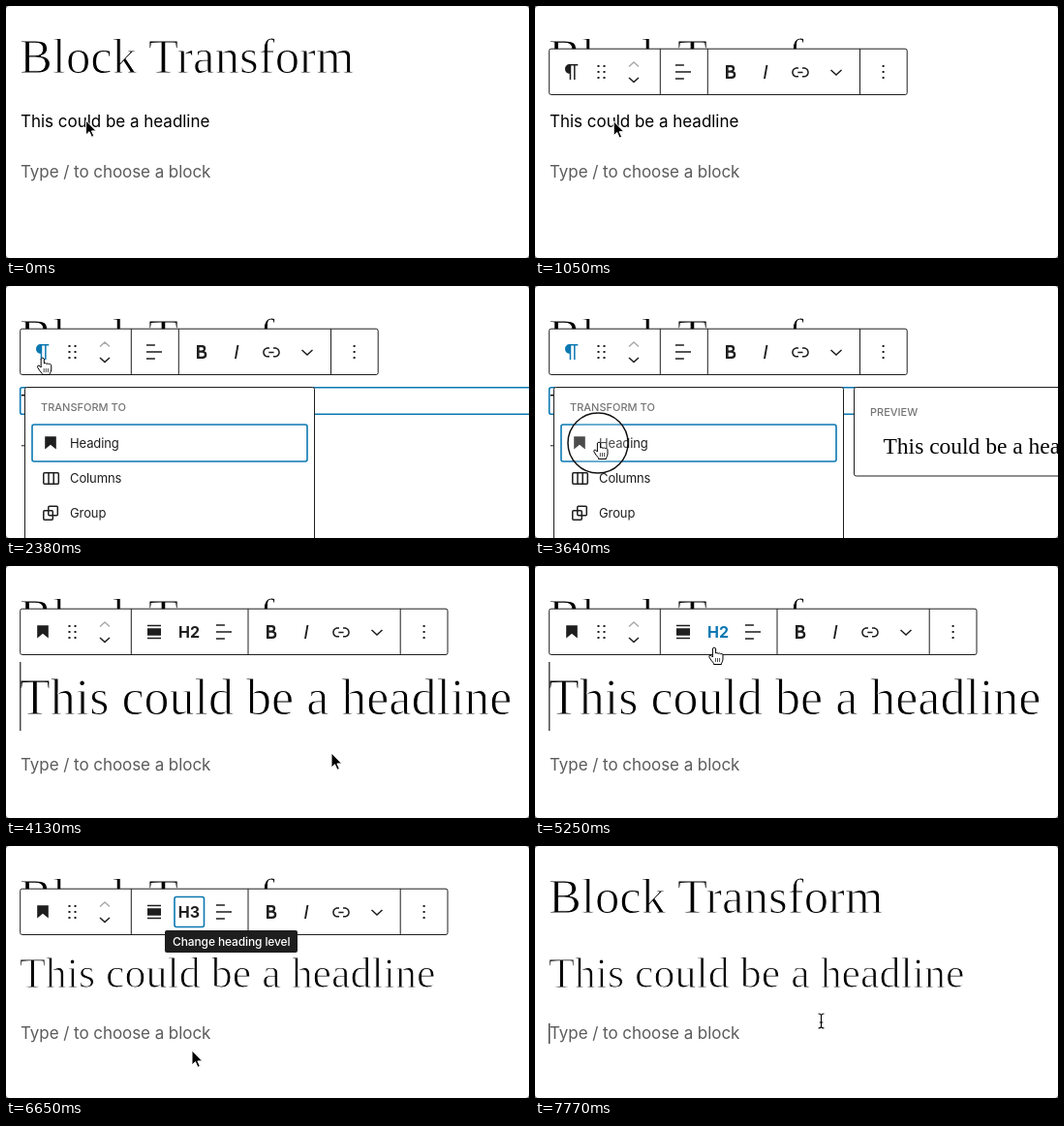
These frames come from a looping animation (540 px wide and 260 px high, 8 s). An HTML page:

```html
<!DOCTYPE html>
<html lang="en">
<head>
<meta charset="utf-8">
<title>Block Transform</title>
<style>
html, body { margin: 0; width: 100%; height: 100%; overflow: hidden; background: #fff; }
svg { display: block; width: 540px; height: 260px; }
text { font-family: Inter, "Open Sans", sans-serif; fill: #1e1e1e; white-space: pre; }
.display { font-family: "Noto Serif", serif; font-weight: 200; font-stretch: 87.5%; fill: #000; }
.plain .display { font-family: "Liberation Serif", serif; font-weight: 400; stroke: #fff; stroke-width: 1.1px; }
.serif { font-family: "Liberation Serif", serif; fill: #000; }
.body { font-size: 17px; letter-spacing: -.02px; fill: #000; }
.hint { font-size: 17px; letter-spacing: -.06px; fill: #5c5c5c; }
.item { font-size: 13px; letter-spacing: -.12px; }
.label { font-size: 11px; font-weight: 500; fill: #757575; }
.level { font-weight: 700; text-anchor: middle; }
.panel { fill: #fff; stroke: #1e1e1e; }
.ring { fill: none; stroke: #0b78b2; stroke-width: 1.6px; }
.line { fill: none; stroke: #1e1e1e; stroke-width: 1.5px; }
</style>
</head>
<body>
<svg id="stage" viewBox="0 0 540 260"></svg>
<script>
const LOOP = 8000;
const INK = '#1e1e1e', BLUE = '#0b78b2';

const icons = {
  para: 'M18.3 4H9.9v-.1l-.9.2c-2.3.4-4 2.4-4 4.8s1.7 4.4 4 4.8l.7.1V20h1.5V5.5h2.9V20h1.5V5.5h2.7V4z',
  mark: 'M6.2 5.2v13.4l5.8-4.8 5.8 4.8V5.2z',
  drag: 'M6.5 5h2v2h-2zM12.5 5h2v2h-2zM6.5 11h2v2h-2zM12.5 11h2v2h-2zM6.5 17h2v2h-2zM12.5 17h2v2h-2z',
  text: 'M4 19.8h8.9v-1.5H4zM4 4.2h8.9v1.5H4zM4 11.2h16v1.5H4z',
  wide: 'M5 4.7h14v1.5H5zM5 8.3h14v7.4H5zM5 17.8h14v1.5H5z',
  bold: 'M14.7 11.3c1-.6 1.5-1.6 1.5-3 0-2.3-1.3-3.4-4-3.4H7v14h5.8c1.4 0 2.5-.3 3.3-1 .8-.7 1.2-1.7 1.2-2.9.1-1.9-.8-3.1-2.6-3.7zm-5.1-4h2.3c.6 0 1.1.1 1.4.4.3.3.5.7.5 1.2s-.2 1-.5 1.2c-.3.3-.8.4-1.4.4H9.6V7.3zm4.6 9c-.4.3-1 .4-1.7.4H9.6v-3.9h2.9c.7 0 1.3.2 1.7.5.4.3.6.8.6 1.5s-.2 1.2-.6 1.5z',
  italic: 'M12.5 5L10 19h1.9l2.5-14z',
  link: 'M15.6 7.2H14v1.5h1.6c2 0 3.7 1.7 3.7 3.7s-1.7 3.7-3.7 3.7H14v1.5h1.6c2.8 0 5.2-2.3 5.2-5.2 0-2.9-2.3-5.2-5.2-5.2zM4.7 12.4c0-2 1.7-3.7 3.7-3.7H10V7.2H8.4c-2.9 0-5.2 2.3-5.2 5.2 0 2.9 2.3 5.2 5.2 5.2H10v-1.5H8.4c-2 0-3.7-1.7-3.7-3.7zm4.6.9h5.3v-1.5H9.3v1.5z',
  down: 'M17 9.4L12 14 7 9.4l-1 1.1 6 5.5 6-5.5z',
  more: 'M13 19h-2v-2h2zM13 13h-2v-2h2zM13 7h-2V5h2z'
};

// Icons are 24px boxes placed by their centre.
const icon = (name, x, y = 68, fill = INK, id = '') =>
  `<path id="${id}" fill="${fill}" transform="translate(${x - 12} ${y - 12})" d="${icons[name]}"/>`;
const text = (cls, x, y, str, extra = '') => `<text class="${cls}" x="${x}" y="${y}" ${extra}>${str}</text>`;
const group = (id, body) => `<g id="${id}">${body}</g>`;
const box = (cls, x, y, w, h) => `<rect class="${cls}" x="${x}" y="${y}" width="${w}" height="${h}" rx="2"/>`;

const movers =
  '<path class="line" style="stroke:#aaa" d="M97 62.5l5-4.5 5 4.5"/><path class="line" d="M97 74l5 4.5 5-4.5"/>';

function toolbar(width, seps, shift) {
  return box('panel', 14.7, 44.2, width, 47.3) +
    seps.map(x => `<path stroke="${INK}" d="M${x} 44v47"/>`).join('') +
    icon('drag', 70) + movers +
    icon('text', 153 + shift) + icon('bold', 202 + shift) + icon('italic', 238 + shift) +
    icon('link', 274 + shift) + icon('down', 311 + shift) + icon('more', 359.6 + shift);
}

const columnsIcon = '<rect class="line" x="38.8" y="192.8" width="15.5" height="11.5" rx="1"/><path class="line" d="M44 193v11M49.2 193v11"/>';
const groupIcon = '<rect class="line" x="43.8" y="227.3" width="9.5" height="9.5" rx="1"/><rect class="line" x="38.8" y="231.8" width="9.5" height="9.5" rx="1"/>';

const levels = [1, 2, 3, 4].map((n, i) => {
  const y = 131 + 36 * i, on = n === 2;
  return (on ? `<rect x="184" y="${y - 12}" width="24" height="24" rx="1" fill="${INK}"/>` : '') +
    text('level', 196, y + 5, 'H' + n, `font-size="14" style="fill:${on ? '#fff' : INK}"`) +
    text('item', 216, y + 5, 'Heading ' + n);
}).join('');

const arrow = '<path fill="#000" stroke="#fff" d="M0 0V15l3.5-3.3 2.5 5.6 2.4-1-2.5-5.4h4.8Z"/>';
const hand = '<path fill="#fff" stroke="#000" stroke-linejoin="round" ' +
  'd="M-1.6 0q1.6-2 3.2 0V5q1.4-1 2.5.3 1.4-.9 2.5.4 1.5-.7 2.4.8V11q0 2.5-1.5 4.3V16.5H-.5V15.3Q-3.6 12-5.2 8.8-5.4 6.8-3.8 7.1-2.6 7.6-1.6 9Z"/>' +
  '<path stroke="#000" stroke-width=".7" d="M1.4 10v4M3.5 10v4M5.6 10v4"/>';
const beam = 'M-3-7Q-.5-7 0-5.5Q.5-7 3-7M0-5.5V6.5M-3 8Q-.5 8 0 6.5Q.5 8 3 8M-1.8 2H1.8';
const ibeam = ['#fff" stroke-width="2.6', '#000" stroke-width="1.1']
  .map(s => `<path fill="none" stroke="${s}" d="${beam}"/>`).join('');

const stage = document.getElementById('stage');
const line = 'This could be a headline';
stage.innerHTML =
  text('display', 14, 69, 'Block Transform', 'id="title"') +
  text('body', 15, 125, line, 'id="para"') +
  text('display', 14, 153, line, 'id="head"') +
  text('hint', 15, 177, 'Type / to choose a block', 'id="hint"') +
  `<rect id="caret" x="14.2" width="1.2" fill="${INK}"/>` +
  group('outline', box('ring', 14.7, 104.7, 540, 27.6)) +
  group('barPara', toolbar(369.5, [129.3, 178.3, 335.5], 0) + icon('para', 38, 68, INK, 'mode')) +
  group('barHead', toolbar(441.3, [129.3, 250, 407.2], 72) + icon('mark', 38) + icon('wide', 153) +
    text('level', 189, 74, 'H2', 'id="level" font-size="16"')) +
  group('focus', box('ring', 174, 52.5, 30.5, 31)) +
  group('menu', box('panel', 19.5, 104.5, 299, 200) + text('label', 36, 129, 'TRANSFORM TO') +
    box('ring', 27, 143, 284, 38) + icon('mark', 46, 162) + columnsIcon + groupIcon +
    ['Heading', 'Columns', 'Group'].map((s, i) => text('item', 66, 167 + 36 * i, s)).join('')) +
  group('preview', box('panel', 329.5, 104.5, 300, 91.5) + text('label', 346, 134, 'PREVIEW') +
    text('serif', 359.5, 173, line, 'font-size="23.5"')) +
  group('levels', box('panel', 169.5, 104.5, 202, 240) + box('ring', 177, 112, 187, 38) + levels) +
  group('tip', `<rect x="164" y="87" width="137" height="23" rx="2" fill="${INK}"/>` +
    text('', 172, 102.5, 'Change heading level', 'font-size="12" font-weight="500" letter-spacing="-.12" style="fill:#fff"')) +
  '<circle id="ping" fill="#fff" fill-opacity=".2" stroke="#111" stroke-width="1.5"/>' +
  group('cursor', group('arrow', arrow) + group('hand', hand) + group('ibeam', ibeam)) +
  '<path fill="#777" fill-rule="evenodd" d="M0 0H540V260H0ZM4 0Q0 0 0 4V256Q0 260 4 260H536Q540 260 540 256V4Q540 0 536 0Z"/>';

const el = {};
stage.querySelectorAll('[id]').forEach(n => { if (n.id) el[n.id] = n; });

// Use a plain serif where the light cut is not installed.
function hasLight() {
  const width = weight => {
    el.head.style.fontWeight = weight;
    return el.head.getComputedTextLength();
  };
  el.head.setAttribute('font-size', 100);
  const differs = Math.abs(width(200) - width(400)) > 1;
  el.head.style.fontWeight = '';
  return differs;
}
stage.classList.toggle('plain', !hasLight());

// Font size at which a line of text has the given width
function sizeFor(node, width) {
  node.setAttribute('font-size', 100);
  return 100 * width / node.getComputedTextLength();
}
el.title.setAttribute('font-size', sizeFor(el.title, 345.5));
const big = sizeFor(el.head, 508.5), small = big * .845;

// Pointer stops: time, x, y
const path = [
  [0, 82.5, 118], [540, 82.5, 118], [650, 80, 113], [770, 82, 118], [900, 82, 118], [1120, 81, 119],
  [1380, 81, 119], [1840, 37, 75], [2170, 37, 75], [2480, 38, 75], [3020, 66, 162], [3740, 66, 162],
  [3990, 336, 193], [4740, 336, 193], [5200, 185, 85], [5300, 185, 85], [5500, 189, 71], [5740, 189, 71],
  [6180, 192, 211], [7240, 192, 211], [7560, 295.5, 180], [LOOP, 295.5, 180]
];
// Clicks: start, end, x, y, radius
const clicks = [
  [70, 140, 83, 119, 22], [2030, 2170, 36.5, 71, 31], [3530, 3710, 65, 162, 31],
  [5530, 5670, 189, 70, 31], [6230, 6370, 192, 211, 31], [7560, 7700, 295, 180, 31]
];
// Caret: start, end, y, height
const carets = [[70, 560, 162, 20], [3990, 4480, 99, 71], [4970, 5460, 99, 71], [7700, LOOP, 183, 21]];

const within = (t, a, b) => t >= a && t < b;
const show = (id, on) => { el[id].style.display = on ? '' : 'none'; };
const set = (id, attrs) => { for (const k in attrs) el[id].setAttribute(k, attrs[k]); };
const ease = u => u * u * (3 - 2 * u);

function pointer(t) {
  let i = 1;
  while (path[i][0] <= t) i++;
  const [t0, x0, y0] = path[i - 1], [t1, x1, y1] = path[i];
  const u = ease((t - t0) / (t1 - t0));
  return [x0 + (x1 - x0) * u, y0 + (y1 - y0) * u];
}

function popover(id, t, from, to, x, y) {
  show(id, within(t, from, to));
  const s = Math.min(1, .5 + (t - from) / 200);
  set(id, { transform: `translate(${x} ${y}) scale(${s}) translate(${-x} ${-y})` });
}

function draw(t) {
  const isPara = t < 3710, isSmall = t >= 6440;
  show('para', isPara);
  show('head', !isPara);
  set('head', { 'font-size': isSmall ? small : big, y: isSmall ? 145.5 : 153 });
  set('hint', { y: isPara ? 177.3 : isSmall ? 199.3 : 211 });

  show('barPara', within(t, 910, 3710));
  show('barHead', within(t, 3710, 7700));
  show('outline', within(t, 1750, 3710));
  set('mode', { fill: t >= 1700 ? BLUE : INK });
  el.level.textContent = isSmall ? 'H3' : 'H2';
  el.level.style.fill = within(t, 5110, 6440) ? BLUE : INK;
  show('focus', within(t, 6440, 7700));
  show('tip', within(t, 6510, 7700));

  popover('menu', t, 2240, 3710, 38, 104);
  show('preview', within(t, 2940, 3710));
  popover('levels', t, 5670, 6440, 189, 104);

  const caret = carets.find(c => within(t, c[0], c[1]));
  show('caret', caret);
  if (caret) set('caret', { y: caret[2], height: caret[3] });

  const click = clicks.find(c => within(t, c[0], c[1]));
  show('ping', click);
  if (click) set('ping', { cx: click[2], cy: click[3], r: click[4] });

  const [x, y] = pointer(t);
  set('cursor', { transform: `translate(${x} ${y})` });
  const isHand = within(t, 1640, 3760) || within(t, 5040, 6440), isBeam = t >= 7400;
  show('hand', isHand);
  show('ibeam', isBeam);
  show('arrow', !isHand && !isBeam);
}

const start = performance.now();
function tick() {
  draw((performance.now() - start) % LOOP);
  requestAnimationFrame(tick);
}
tick();
</script>
</body>
</html>
```
